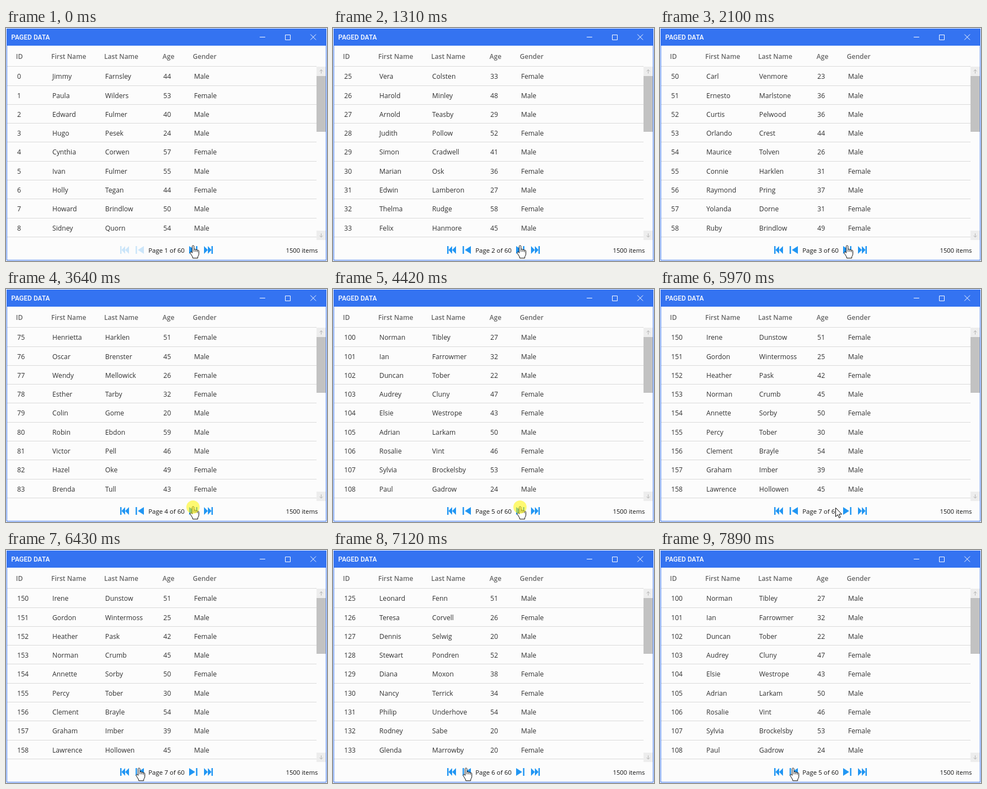
An HTML page for the animation above (8000 ms loop, 582 by 422 pixels).

```html
<!DOCTYPE html>
<html lang="en">
<head>
<meta charset="utf-8">
<title>Paged data</title>
<style>
  html, body { margin: 0; width: 100%; height: 100%; overflow: hidden; background: #fff; }
  svg { display: block; width: 582px; height: 422px; }
  text { font: 12.2px "Open Sans", "Noto Sans", sans-serif; fill: #303030; white-space: pre; }
  .title { font: 500 12px Roboto, sans-serif; fill: #fff; }
  .head { font-size: 12px; font-weight: 600; fill: #666; }
  .foot { font-size: 11.5px; fill: #111; }
  .icon { fill: #2196f3; }
</style>
</head>
<body>
<svg id="stage" viewBox="0 0 582 422">
  <rect x="1.5" y="1.5" width="579" height="419" fill="#fcfcfc" stroke="#3473f1"/>
  <rect x="1" y="1" width="580" height="31" fill="#3473f1"/>
  <text class="title" x="9.6" y="21">PAGED DATA</text>
  <path d="M460 16.5H470M506.5 12.5H515.5V21.5H506.5ZM552 11.5L562 21.5M562 11.5L552 21.5" fill="none" stroke="#fff"/>

  <g id="table"></g>

  <rect x="563" y="70" width="17" height="17" fill="#ededed"/>
  <rect x="563" y="367" width="17" height="17" fill="#ededed"/>
  <rect x="563" y="87" width="17" height="101" fill="#c2c2c2"/>
  <path d="M571.5 82.5V75.5M568.5 78.5L571.5 75.5L574.5 78.5M571.5 372V379M568.5 376L571.5 379L574.5 376" fill="none" stroke="#b4b4b4"/>

  <g class="icon">
    <g id="back">
      <path d="M207 395H209.5V409H207ZM216 395V409L209.5 402ZM223 395V409L216 402Z"/>
      <path d="M235 395H237.5V409H235ZM250 395V409L239 402Z"/>
    </g>
    <path d="M332 395V409L343 402ZM344.5 395H347V409H344.5Z"/>
    <path d="M359 395V409L366 402ZM366 395V409L372.5 402ZM372.5 395H375V409H372.5Z"/>
  </g>
  <text class="foot" id="label" x="258.2" y="407"></text>
  <text class="foot" x="565.3" y="407" text-anchor="end" style="font-size:11.3px">1500 items</text>

  <g id="cursor" fill="#fff" stroke="#000" stroke-linejoin="round">
    <g id="hand" transform="translate(-.8 -1)">
      <path d="M-1.6 13.5V1.8C-1.6-.4 1.7-.4 1.7 1.8V7.5C2.4 6.2 4.7 6.4 5 8C5.6 7 7.7 7.3 8 9C8.6 8 10.5 8.5 10.5 10.5V15.5C10.5 18 8.8 19 8.5 21V23H-.5C-.5 20-3 18-4.5 14.8C-6 12.3-4.3 10.5-2.6 12.2Z"/>
      <path d="M1.7 7.5V11.5M5 8V11.5M8 9V12" fill="none"/>
    </g>
    <path id="arrow" d="M.5 .5V16.5L4.2 13L6.7 18.8L9.1 17.7L6.7 12.1H11.6Z"/>
  </g>
  <circle id="press" r="12" fill="#fff500" fill-opacity=".55"/>
</svg>
<script>
const LOOP = 8000, ROWS = 9, PAGE_SIZE = 25;
const COLUMNS = [20.2, 84, 179.8, 285.3, 340.9];
const HEADS = [["ID", 18], ["First Name", 82.1], ["Last Name", 178.1], ["Age", 283.8], ["Gender", 338.8]];

const PEOPLE = {
  1: "Jimmy Farnsley 44 M,Paula Wilders 53 F,Edward Fulmer 40 M,Hugo Pesek 24 M,Cynthia Corwen 57 F,Ivan Fulmer 55 M,Holly Tegan 44 F,Howard Brindlow 50 M,Sidney Quorn 54 M",
  2: "Vera Colsten 33 F,Harold Minley 48 M,Arnold Teasby 29 M,Judith Pollow 52 F,Simon Cradwell 41 M,Marian Osk 36 F,Edwin Lamberon 27 M,Thelma Rudge 58 F,Felix Hanmore 45 M",
  3: "Carl Venmore 23 M,Ernesto Marlstone 36 M,Curtis Pelwood 36 M,Orlando Crest 44 M,Maurice Tolven 26 M,Connie Harklen 31 F,Raymond Pring 37 M,Yolanda Dorne 31 F,Ruby Brindlow 49 F",
  4: "Henrietta Harklen 51 F,Oscar Brenster 45 M,Wendy Mellowick 26 F,Esther Tarby 32 F,Colin Gome 20 M,Robin Ebdon 59 M,Victor Pell 46 M,Hazel Oke 49 F,Brenda Tull 43 F",
  5: "Norman Tibley 27 M,Ian Farrowmer 32 M,Duncan Tober 22 M,Audrey Cluny 47 F,Elsie Westrope 43 F,Adrian Larkam 50 M,Rosalie Vint 46 F,Sylvia Brockelsby 53 F,Paul Gadrow 24 M",
  6: "Leonard Fenn 51 M,Teresa Corvell 26 F,Dennis Selwig 20 M,Stewart Pondren 52 M,Diana Moxon 38 F,Nancy Terrick 34 F,Philip Underhove 54 M,Rodney Sabe 20 M,Glenda Marrowby 20 F",
  7: "Irene Dunstow 51 F,Gordon Wintermoss 25 M,Heather Pask 42 F,Norman Crumb 45 M,Annette Sorby 50 F,Percy Tober 30 M,Clement Brayle 54 M,Graham Imber 39 M,Lawrence Hollowen 45 M"
};

// Each click: press time, release time, page shown after release
const CLICKS = [
  [1230, 1310, 2], [1930, 2015, 3], [2800, 2860, 4], [3640, 3720, 5],
  [4420, 4500, 6], [5200, 5340, 7], [6980, 7120, 6], [7730, 7815, 5]
];

// Pointer travel from "next" to "previous" in equal time steps
const MOVE_START = 5810, MOVE_STEP = 77.5;
const PATH_X = [340, 338, 329, 318, 304, 289, 273, 258, 247, 242];

const $ = id => document.getElementById(id);
const show = (el, on) => el.setAttribute("display", on ? "inline" : "none");

function add(tag, attrs, text = "") {
  const el = document.createElementNS("http://www.w3.org/2000/svg", tag);
  for (const key in attrs) el.setAttribute(key, attrs[key]);
  el.textContent = text;
  return $("table").appendChild(el);
}

const lineY = i => Math.floor(69.67 + 34.33 * i);

HEADS.forEach(([text, x]) => add("text", { class: "head", x, y: 56 }, text));
const cells = [];
for (let i = 0; i <= ROWS; i++) {
  add("rect", { x: 2, y: lineY(i), width: 561, height: 1, fill: "#dadada" });
  if (i < ROWS) cells.push(COLUMNS.map(x => add("text", { x, y: lineY(i) + 23 })));
}

let shownPage = 0;
function showPage(page) {
  if (page === shownPage) return;
  shownPage = page;
  PEOPLE[page].split(",").forEach((person, i) => {
    const [first, last, age, sex] = person.split(" ");
    const values = [(page - 1) * PAGE_SIZE + i, first, last, age, sex === "M" ? "Male" : "Female"];
    values.forEach((value, c) => cells[i][c].textContent = value);
  });
  $("label").textContent = `Page ${page} of 60`;
  $("back").setAttribute("opacity", page === 1 ? 0.22 : 1);
}

function render(t) {
  let page = 1, pressed = false;
  for (const [down, up, next] of CLICKS) {
    if (t >= up) page = next;
    else if (t >= down) pressed = true;
  }
  showPage(page);

  const last = PATH_X.length - 1;
  const step = Math.max(0, Math.min(last, Math.floor((t - MOVE_START) / MOVE_STEP) + 1));
  const x = PATH_X[step];
  const y = step ? 395.8 : 394.8;
  const onButton = x > 331 || x < 252;
  show($("hand"), onButton);
  show($("arrow"), !onButton);
  $("cursor").setAttribute("transform", `translate(${x} ${y})`);

  show($("press"), pressed);
  $("press").setAttribute("cx", x - 1);
  $("press").setAttribute("cy", y + 0.2);
}

const start = performance.now();
function tick() {
  render((performance.now() - start) % LOOP);
  requestAnimationFrame(tick);
}
tick();
</script>
</body>
</html>
```
